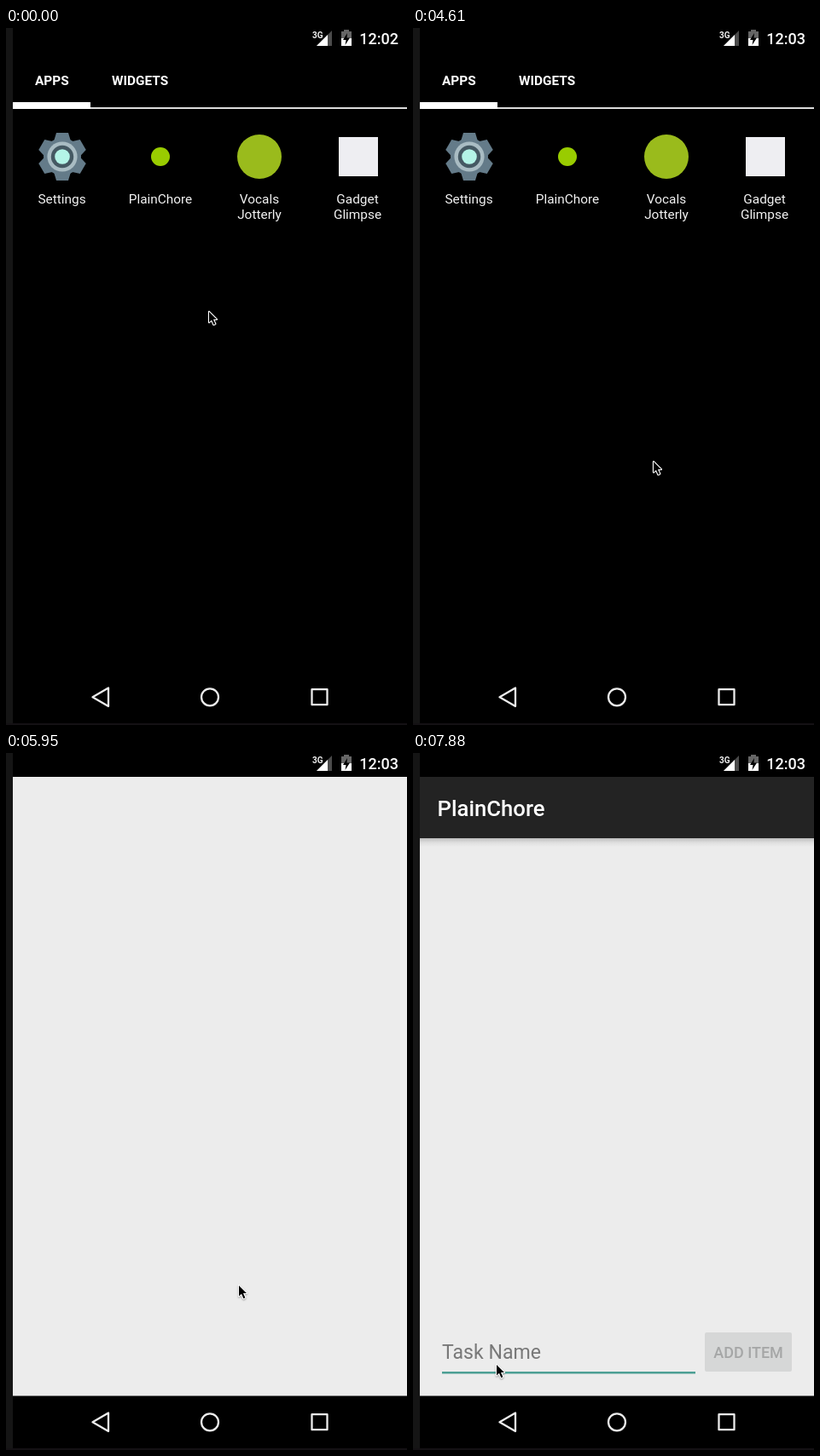
Recreate the animation shown at these times as an HTML page with a canvas. Size 470 by 818 pixels, loop 8 s.

```html
<!DOCTYPE html>
<html lang="en">
<head>
<meta charset="utf-8">
<title>Opening a task app</title>
<style>
html, body { margin: 0; width: 100%; height: 100%; overflow: hidden; background: #000; }
canvas { display: block; }
</style>
</head>
<body>
<canvas id="stage" width="470" height="818"></canvas>
<script>
const c = document.getElementById('stage').getContext('2d');
const LOOP = 8000, TICK = 148.6, LEAD = 292;
const PAPER = '#ececec', TEAL = '#4c9f94', STEEL = '#647b89';
const APP = 'PlainChore';

// Ticks at which the screen changes
const PRESS = 25, RELEASE = 27, MINUTE = 28, OPENING = 30, OPENED = 31, READY = 39;

// Pointer moves: it eases to (x, y) between two ticks and rests otherwise
const HOME = { x: 237, y: 331 };
const moves = [
  { from: -1, to: 1, x: 272, y: 449 },
  { from: 1, to: 4, x: 112, y: 215 },
  { from: 4, to: 7, x: 174, y: 165 },
  { from: 7, to: 10, x: 178, y: 152 },
  { from: 14, to: 18, x: 203, y: 404 },
  { from: 18, to: 22, x: 174, y: 170 },
  { from: 27, to: 29, x: 281, y: 507 },
  { from: 32, to: 38, x: 272, y: 623 },
  { from: 38, to: 40, x: 291, y: 606 },
  { from: 40, to: 42, x: 285, y: 573 },
  { from: 42, to: 50, x: 97, y: 716 }
];

const clamp = u => Math.min(1, Math.max(0, u));
const ease = u => u * u * (3 - 2 * u);

function pointerAt(tick) {
  let { x, y } = HOME;
  for (const m of moves) {
    const u = ease(clamp((tick - m.from) / (m.to - m.from)));
    x += (m.x - x) * u;
    y += (m.y - y) * u;
  }
  return [Math.round(x), Math.round(y)];
}

function box(x0, y0, x1, y1, fill) {
  c.fillStyle = fill;
  c.fillRect(x0, y0, x1 - x0, y1 - y0);
}

function disc(x, y, r, fill) {
  c.fillStyle = fill;
  c.beginPath();
  c.arc(x, y, r, 0, 2 * Math.PI);
  c.fill();
}

function poly(points, fill) {
  c.beginPath();
  points.forEach(([x, y]) => c.lineTo(x, y));
  c.closePath();
  if (fill) { c.fillStyle = fill; c.fill(); }
}

function text(str, x, y, size, weight = 400, fill = '#fff', align = 'left') {
  c.font = `${weight} ${size}px Roboto, sans-serif`;
  c.textAlign = align;
  c.fillStyle = fill;
  c.fillText(str, x, y);
}

function gradient(x0, y0, x1, y1, ...colors) {
  const g = c.createLinearGradient(x0, y0, x1, y1);
  colors.forEach((col, i) => g.addColorStop(i / (colors.length - 1), col));
  return g;
}

function label(x, ...lines) {
  lines.forEach((s, i) => text(s, x, 206 + i * 17.5, 15.4, 400, '#f2f2f2', 'center'));
}

function gear(x, y) {
  c.save();
  c.translate(x, y);
  for (let i = 0; i < 6; i++) {
    poly([[-10, -18], [-7, -28], [7, -28], [10, -18]], STEEL);
    c.rotate(Math.PI / 3);
  }
  c.restore();
  [STEEL, '#a9bcc3', '#455963', '#b4f4e7']
    .forEach((col, i) => disc(x, y, 22 - i * 4.4, col));
}

function launcher(pressed) {
  text('APPS', 34, 67, 15.4, 700);
  text('WIDGETS', 124, 67, 15.4, 700);
  box(8, 93, 470, 95, '#dcdcdc');
  box(8, 87, 99, 95, '#fff');

  gear(66, 151);
  label(65.5, 'Settings');
  c.globalAlpha = pressed ? 0.4 : 1;
  disc(181, 151, 11, '#99cc00');
  label(181, APP);
  c.globalAlpha = 1;
  disc(297, 151, 26, '#9abb1c');
  label(297, 'Vocals', 'Jotterly');
  box(390, 128, 436, 174, '#eeeef2');
  label(412, 'Gadget', 'Glimpse');
}

function statusBar(fill, time) {
  box(8, 0, 470, 28, fill);
  text('3G', 359, 12, 10, 700, '#eee');
  poly([[364, 21], [382, 3], [382, 21]], '#4b4b4b');
  poly([[364, 21], [377, 8], [377, 21]], '#fff');
  box(396, 2, 402, 5, '#666');
  box(393, 4, 405, 12, '#666');
  box(393, 12, 405, 21, '#fff');
  poly([[400, 6], [395, 14], [398.5, 14], [397.5, 20], [403, 11.5], [399.5, 11.5]], '#000');
  text(time, 460, 19, 18, 500, '#fff', 'right');
}

function navBar(fill) {
  box(8, 755, 470, 816, fill);
  c.strokeStyle = '#ececec';
  c.lineWidth = 2.3;
  c.lineJoin = 'round';
  poly([[101.5, 785.3], [120, 774.5], [120, 796]]);
  c.stroke();
  c.beginPath();
  c.arc(239, 785.3, 10, 0, 2 * Math.PI);
  c.stroke();
  c.strokeRect(358.5, 776.2, 18, 18);
}

function taskScreen(caret) {
  box(8, 100, 470, 110, gradient(0, 100, 0, 110, '#bdbdbd', '#dedede', PAPER));
  box(8, 28, 470, 100, '#232323');
  text(APP, 28.5, 74, 25.7, 500);
  text('Task Name', 34, 711, 23.1, 400, '#787878');
  box(34, 726, 331, 728.5, TEAL);
  if (caret) box(34, 686, 36, 718, TEAL);
  c.fillStyle = '#d6d7d7';
  c.beginPath();
  c.roundRect(342, 680, 102, 46, 2);
  c.fill();
  text('ADD ITEM', 393, 710, 18, 500, '#a5a6a6', 'center');
}

function pointer([x, y]) {
  c.save();
  c.translate(x + 1, y + 2);
  poly([[0, 0], [0, 12.5], [3, 9.8], [5.4, 15.2], [7.4, 14.3], [5, 9], [9, 9]]);
  c.shadowColor = 'rgba(0,0,0,.35)';
  c.shadowBlur = 2;
  c.shadowOffsetY = 1;
  c.strokeStyle = '#fff';
  c.lineWidth = 2.2;
  c.stroke();
  c.shadowColor = 'transparent';
  c.fillStyle = '#000';
  c.fill();
  c.restore();
}

function draw(t) {
  const tick = Math.max(-1, Math.floor((t - LEAD) / TICK));
  const opening = tick === OPENING;
  box(0, 0, 470, 818, '#000');

  if (tick < OPENED) {
    launcher(tick >= PRESS && tick < RELEASE);
    if (opening) box(43.5, 54, 402, 607, PAPER);
  } else {
    box(8, 28, 470, 754.5, PAPER);
    if (tick >= READY) {
      taskScreen(Math.floor((tick - READY) * TICK / 500) % 2 === 0);
    }
  }

  statusBar(opening ? '#030d11' : '#000', tick < MINUTE ? '12:02' : '12:03');
  navBar(opening
    ? gradient(8, 770, 470, 800, '#2a2021', '#442c33', '#633a46', '#6d414c', '#56504c')
    : '#000');
  box(0, 0, 8, 818, '#151515');
  box(0, 816, 470, 818, '#141114');
  pointer(pointerAt(tick));
}

const start = performance.now();
function loop() {
  draw((performance.now() - start) % LOOP);
  requestAnimationFrame(loop);
}
loop();
</script>
</body>
</html>
```
